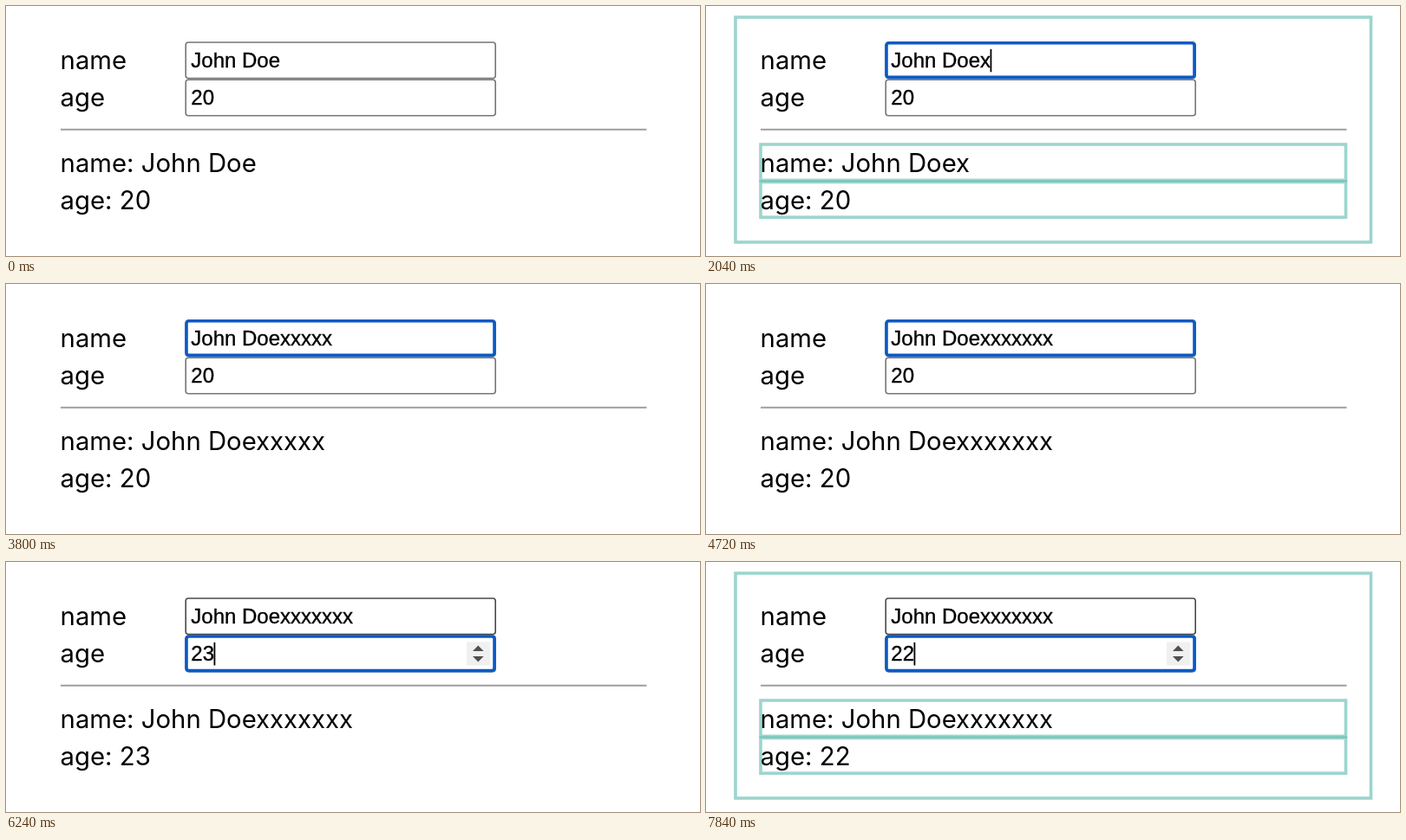
These frames come from a looping animation (800x289 px, 8 s). An HTML page:

```html
<!DOCTYPE html>
<html lang="en">
<head>
<meta charset="utf-8">
<title>Form updates</title>
<style>
  html, body { margin: 0; width: 100%; height: 100%; overflow: hidden; background: #fff; }
  svg { display: block; width: 100%; height: 100%; }
  text { white-space: pre; fill: #000; }
  .page { font: 29.3px Inter, "Open Sans", sans-serif; }
  .value { font: 24px "Liberation Sans", Arial, sans-serif; stroke: #000; stroke-width: .35; }
  .field { fill: #fff; stroke: #767676; stroke-width: 1.6; }
  .field.visited { stroke: #4a4a4a; }
  .ring { fill: none; stroke: #0a5ac6; stroke-width: 3.6; }
  .caret { fill: #000; }
  .flash { fill: none; stroke: #3bab9d; stroke-width: 3.6; }
  .flash rect { opacity: .5; }
</style>
</head>
<body>
<svg viewBox="0 0 800 289">
  <g class="page">
    <text x="62.6" y="73">name</text>
    <text x="62.6" y="116.3">age</text>
    <text id="nameOut" x="62.6" y="192"></text>
    <text id="ageOut" x="62.6" y="235"></text>
  </g>
  <rect x="63" y="141.8" width="675.5" height="2" fill="#9f9f9f"/>

  <rect id="nameField" class="field" x="207.2" y="42" width="357" height="41.6" rx="3"/>
  <rect class="field" x="207.2" y="85.2" width="357" height="41.6" rx="3"/>
  <text id="nameValue" class="value" x="213.3" y="70.8"></text>
  <text id="ageValue" class="value" x="213.3" y="114.2"></text>

  <g id="spinner">
    <rect x="531" y="92.5" width="27" height="27" fill="#f0f0f0"/>
    <path d="M538 103 L544.3 96.5 L550.6 103 Z M538 109 L544.3 115.5 L550.6 109 Z" fill="#505050"/>
  </g>
  <rect id="ring" class="ring" x="208" width="355" height="39.6" rx="3"/>
  <rect id="caret" class="caret" width="1.8" height="26.5"/>

  <g id="flash" class="flash">
    <rect x="34" y="13" width="732.5" height="260"/>
    <rect x="63" y="160" width="674.5" height="41.4"/>
    <rect x="63" y="203.5" width="674.5" height="40.7"/>
  </g>
</svg>
<script>
const LOOP = 8000, BLINK = 520, FLASH = 260;
const FOCUS_NAME = 40, FOCUS_AGE = 4800;
const typed = [1800, 2160, 2500, 3040, 3280, 3860, 4200];
const steps = [[5240, 1], [5600, 1], [5960, 1], [6260, 1], [6520, 1],
               [7200, -1], [7480, -1], [7760, -1]];

const updates = [...typed, ...steps.map(s => s[0])];
const caretResets = [FOCUS_NAME, 1240, FOCUS_AGE, ...updates];
const el = id => document.getElementById(id);
const show = (id, on) => el(id).setAttribute("visibility", on ? "visible" : "hidden");
const latest = (times, t) => Math.max(-Infinity, ...times.filter(s => s <= t));

function setText(id, text) {
  if (el(id).textContent !== text) el(id).textContent = text;
}

function render(t) {
  const name = "John Doe" + "x".repeat(typed.filter(s => s <= t).length);
  const age = steps.reduce((sum, [at, by]) => at <= t ? sum + by : sum, 20);
  setText("nameValue", name);
  setText("ageValue", String(age));
  setText("nameOut", "name: " + name);
  setText("ageOut", "age: " + age);

  const focused = t >= FOCUS_NAME, onAge = t >= FOCUS_AGE;
  el("nameField").classList.toggle("visited", onAge);
  show("spinner", onAge);
  show("ring", focused);
  el("ring").setAttribute("y", onAge ? 86 : 42.8);

  const idle = t - latest(caretResets, t);
  const input = el(onAge ? "ageValue" : "nameValue");
  show("caret", focused && Math.floor(idle / BLINK) % 2 === 0);
  el("caret").setAttribute("x", 212.8 + input.getComputedTextLength());
  el("caret").setAttribute("y", onAge ? 93 : 49.8);

  show("flash", t - latest(updates, t) < FLASH);
}

const start = performance.now();
function tick() {
  render((performance.now() - start) % LOOP);
  requestAnimationFrame(tick);
}
tick();
</script>
</body>
</html>
```
